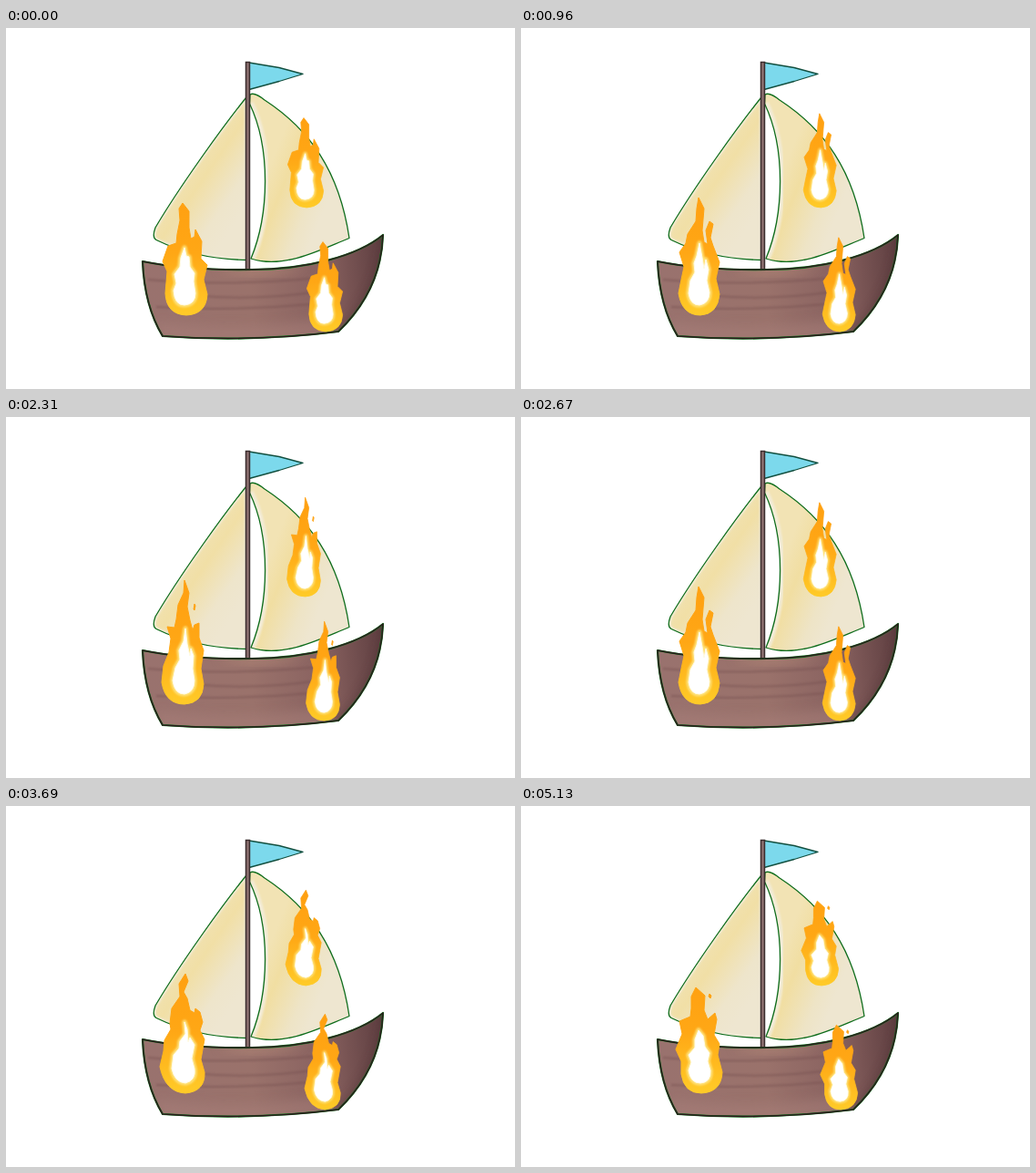
An HTML page without scripts that plays this animation: 559 by 396 pixels, repeating every 5190 ms.

```html
<!DOCTYPE html>
<html lang="en">
<head>
<meta charset="utf-8">
<title>Burning sailboat</title>
<style>
  @property --tick { syntax: "<integer>"; inherits: true; initial-value: 0; }

  html, body { margin: 0; width: 100%; height: 100%; overflow: hidden; background: #fff; }
  svg { display: block; width: 559px; height: 396px; }

  /* One tick is 30 ms; a pose is due every 72 ms and waits for the next tick. */
  #scene { animation: clock 5190ms steps(173) infinite; }
  @keyframes clock { from { --tick: 0; } to { --tick: 173; } }

  .pose {
    --now: mod(round(down, (var(--tick) * 5 + .5) / 12, 1), 6);
    opacity: calc(1 - max(var(--now) - var(--i), var(--i) - var(--now)));
  }
  .fire { fill: url(#fire); stroke: url(#fire); stroke-width: 1; stroke-linejoin: round; }
  .glow { fill: #ffe68c; stroke: #ffe27c; stroke-width: 5; stroke-linejoin: round; filter: url(#soft2); }
  .core { fill: #fff; stroke: #fffbe6; stroke-width: 1; stroke-linejoin: round; }
  .edge { fill: none; stroke: #0f6d1c; stroke-width: 1.3; stroke-linejoin: round; }
  .plank { fill: none; stroke: #74504f; stroke-width: 2; opacity: .5; filter: url(#soft2); }
</style>
</head>
<body>
<svg id="scene" viewBox="0 0 559 396">
  <defs>
    <filter id="soft2" x="-20%" y="-40%" width="140%" height="180%"><feGaussianBlur stdDeviation="1.300"/></filter>
    <filter id="soft6" x="-30%" y="-50%" width="160%" height="200%"><feGaussianBlur stdDeviation="6"/></filter>
    <linearGradient id="fire" gradientUnits="userSpaceOnUse" x1="0" y1="180" x2="0" y2="315">
      <stop offset="0" stop-color="#ff9f10"/>
      <stop offset=".5" stop-color="#ffa715"/>
      <stop offset="1" stop-color="#ffcb28"/>
    </linearGradient>
    <linearGradient id="leftCloth" gradientUnits="userSpaceOnUse" x1="190" y1="150" x2="262" y2="200">
      <stop offset="0" stop-color="#f0e3b8"/>
      <stop offset=".35" stop-color="#f1dfa6"/>
      <stop offset=".75" stop-color="#eee5cb"/>
      <stop offset="1" stop-color="#eee6d0"/>
    </linearGradient>
    <linearGradient id="rightCloth" gradientUnits="userSpaceOnUse" x1="280" y1="175" x2="348" y2="203">
      <stop offset="0" stop-color="#f2e3b4"/>
      <stop offset=".3" stop-color="#f1dea2"/>
      <stop offset=".75" stop-color="#eee4c6"/>
      <stop offset="1" stop-color="#eee6d0"/>
    </linearGradient>
    <linearGradient id="wood" gradientUnits="userSpaceOnUse" x1="150" y1="285" x2="414" y2="265">
      <stop offset="0" stop-color="#99726e"/>
      <stop offset=".45" stop-color="#9a726b"/>
      <stop offset=".75" stop-color="#896260"/>
      <stop offset="1" stop-color="#5f3f41"/>
    </linearGradient>
    <path id="leftSail" d="M264 76C238 108 190 175 164 219Q160 230 165 232.500C195 247 230 254 265 254.500Z"/>
    <path id="rightSail" d="M268 73Q273 70 284 79C333 111 366 156 377 230.500C345 243 305 265 269 253C289 205 291 132 267.500 83Z"/>
    <path id="hull" d="M150 256Q200 266 270 265C330 265 386 250 414 227Q412 288 365 333Q270 345 172 338Q152 305 150 256Z"/>
    <clipPath id="inLeft"><use href="#leftSail"/></clipPath>
    <clipPath id="inRight"><use href="#rightSail"/></clipPath>
    <clipPath id="inHull"><use href="#hull"/></clipPath>

    <path id="core0" d="M196 241L192 252 191 262 185 270 187 280 184 288Q185 304 196 304Q208 303 208 291L206 278 207 269 202 262 201 251 198 250Z"/>
    <path id="core1" d="M196 236L193 250 190 258 191 268 186 277 184 291Q186 304 196 304Q207 302 207 290L204 277 206 265 203 254 201 264 199 252Z"/>
    <path id="core2" d="M197 232L195 246 190 256 191 266 186 275 183 289Q185 304 196 304Q207 302 207 289L205 276 206 262 203 254 202 262 199 249Z"/>
    <path id="core3" d="M196 237L197 250 191 258 190 266 184 273 182 288Q185 303 197 304Q209 301 207 288L204 277 207 262 202 254 200 259 199 245Z"/>
    <path id="core4" d="M196 240L193 252 190 262 185 270 186 279 183 289Q186 304 197 304Q209 302 208 290L205 277 207 266 202 258 200 251Z"/>
    <path id="core5" d="M195 246L191 256 191 265 184 273 187 281 184 290Q186 304 197 304Q209 303 208 290L205 280 207 271 202 264 200 252Z"/>

    <!-- six poses of one flame, drawn at full size -->
    <g id="flame">
      <g class="pose" style="--i:0">
        <path class="fire" d="M194 192L190 198 191 211 188 226 187 236 178 239 172 256 177 267 175 291Q176 314 198 315Q220 314 221 292L217 276 221 260 214 253 215 234 208 221 207 229 203 231 201 219 201 201Z"/>
        <use href="#core0" class="glow"/><use href="#core0" class="core"/>
      </g>
      <g class="pose" style="--i:1">
        <path class="fire" d="M195 186L193 198 192 212 183 226 181 236 174 246 179 262 176 276 173 291Q177 315 197 315Q216 314 218 292L214 275 218 257 211 239 208 230 211 215 207 212 203 222 205 237 201 235 199 222 201 198Z"/>
        <use href="#core1" class="glow"/><use href="#core1" class="core"/>
      </g>
      <g class="pose" style="--i:2">
        <path class="fire" d="M196 179L195 193 189 206 187 222 185 231 177 230 181 243 179 258 173 273 171 291Q175 315 196 315Q216 314 217 293L214 276 217 256 212 242 212 226 207 228 205 234 202 223 199 208 201 193Z"/>
        <path class="fire" d="M207 205L206 211 207 212 208 207Z"/>
        <use href="#core2" class="glow"/><use href="#core2" class="core"/>
      </g>
      <g class="pose" style="--i:3">
        <path class="fire" d="M197 184L190 195 191 209 182 222 180 238 181 245 174 257 173 269 169 286Q175 314 197 315Q219 313 218 292L214 278 218 256 213 246 216 237 213 226 208 222 207 227 202 224 199 211 195 204 200 192Z"/>
        <use href="#core3" class="glow"/><use href="#core3" class="core"/>
      </g>
      <g class="pose" style="--i:4">
        <path class="fire" d="M195 191L189 200 190 213 184 225 183 236 174 245 170 257 174 271 172 289Q176 315 198 315Q220 313 220 292L215 277 219 258 213 248 215 233 208 211 206 228 202 230 200 214 200 200Z"/>
        <use href="#core4" class="glow"/><use href="#core4" class="core"/>
      </g>
      <g class="pose" style="--i:5">
        <path class="fire" d="M192 199L187 209 187 222 186 231 174 236 177 250 170 267 176 280 176 294Q179 315 198 315Q220 314 221 292L216 273 218 261 212 251 215 234 213 227 205 234 201 224 202 208Z"/>
        <path class="fire" d="M207 206L206 209 208 211 209 208Z"/>
        <use href="#core5" class="glow"/><use href="#core5" class="core"/>
      </g>
    </g>
  </defs>

  <rect width="559" height="396" fill="#fff"/>

  <!-- sails -->
  <use href="#leftSail" fill="url(#leftCloth)"/>
  <g clip-path="url(#inLeft)">
    <use href="#leftSail" fill="none" stroke="#f3eedd" stroke-width="4" filter="url(#soft2)"/>
  </g>
  <use href="#leftSail" class="edge"/>
  <use href="#rightSail" fill="url(#rightCloth)"/>
  <g clip-path="url(#inRight)">
    <path d="M267.500 83C291 132 289 205 269 253" fill="none" stroke="#f3ecd8" stroke-width="9" filter="url(#soft2)"/>
  </g>
  <use href="#rightSail" class="edge"/>

  <!-- flag and mast -->
  <path d="M267 38L300 43.500 326 50.500 300 58.500 267 67.500Z" fill="#7cd9ec" stroke="#124f3f" stroke-width="1.300" stroke-linejoin="round"/>
  <path d="M263.500 37.500H267.500V266H263.500Z" fill="#8d7070" stroke="#3a2c2d" stroke-width="1.500"/>

  <!-- hull -->
  <use href="#hull" fill="url(#wood)"/>
  <g clip-path="url(#inHull)">
    <path d="M165 322Q260 334 350 318L360 345H165Z" fill="#a9817b" opacity=".5" filter="url(#soft6)"/>
    <path d="M230 265Q280 276 330 262Z" fill="#b98f7c" opacity=".8" filter="url(#soft6)"/>
    <path d="M420 222Q418 290 365 338" fill="none" stroke="#48292e" stroke-width="12" opacity=".4" filter="url(#soft6)"/>
    <path class="plank" d="M156 276Q240 284 345 274"/>
    <path class="plank" d="M205 293Q270 300 345 289"/>
    <path class="plank" d="M165 306Q250 311 335 303"/>
  </g>
  <use href="#hull" class="edge" style="stroke:#0d7a1c;stroke-width:2.200"/>
  <use href="#hull" class="edge" style="stroke:#2b1b1d;stroke-width:1.500"/>

  <use href="#flame"/>
  <use href="#flame" transform="translate(192.800 81) scale(.8)"/>
  <use href="#flame" transform="translate(171.800 -55) scale(.8)"/>
</svg>
</body>
</html>
```
